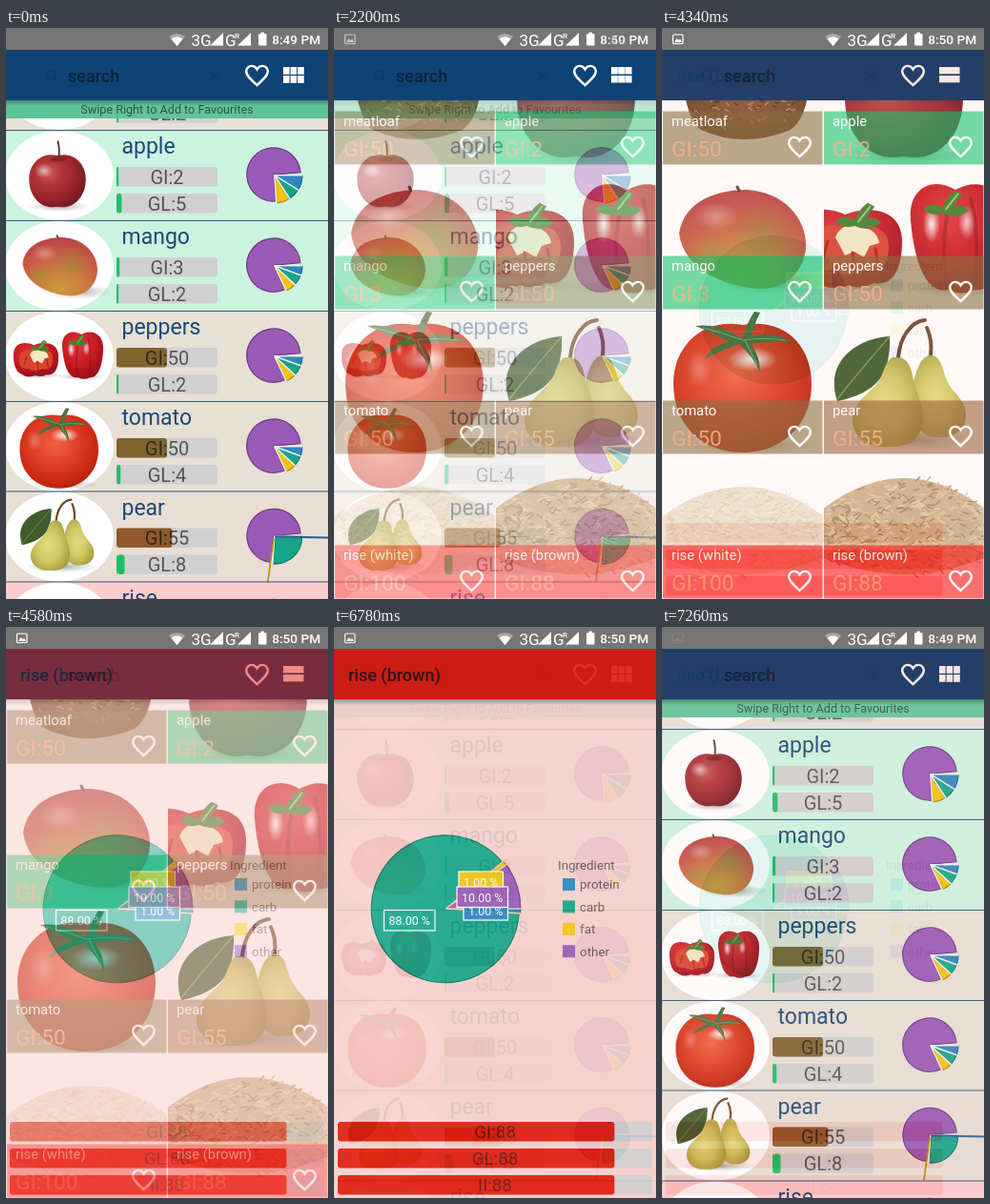
Animation, 338 px wide and 600 px high, one loop 7.32 s. Source, as an HTML page:

```html
<!DOCTYPE html>
<html lang="en">
<head>
<meta charset="utf-8">
<title>Food index app</title>
<style>
  html, body { margin: 0; width: 100%; height: 100%; overflow: hidden; background: #fff; }
  #stage { display: block; width: 338px; height: 600px; font-family: Roboto, "Open Sans", sans-serif; }
</style>
</head>
<body>
<svg id="stage" viewBox="0 0 338 600" xmlns="http://www.w3.org/2000/svg"></svg>
<script>
const LOOP = 7320, STEP = 60;
const GREEN = '#00c461', BROWN = '#80642f', RUST = '#8f592b', RED = '#ff0000';
const SLICES = [['#2e86c1', '#1f5f8b'], ['#17a589', '#0e7562'], ['#f1c40f', '#a88709'], ['#9b59b6', '#6c3b82']];

// --- drawing helpers ---
const rect = (x, y, w, h, fill, extra = '') =>
  `<rect x="${x}" y="${y}" width="${w}" height="${h}" fill="${fill}" ${extra}/>`;
const ellipse = (x, y, rx, ry, fill, extra = '') =>
  `<ellipse cx="${x}" cy="${y}" rx="${rx}" ry="${ry}" fill="${fill}" ${extra}/>`;
const path = (d, fill, extra = '') => `<path d="${d}" fill="${fill}" ${extra}/>`;
const line = (d, color, width, extra = '') =>
  path(d, 'none', `stroke="${color}" stroke-width="${width}" stroke-linecap="round" ${extra}`);
const text = (x, y, size, fill, label, extra = '') =>
  `<text x="${x}" y="${y}" font-size="${size}" fill="${fill}" ${extra}>${label}</text>`;
const MIDDLE = 'text-anchor="middle"';
const MEDIUM = 'font-weight="500"';

const radial = (id, cx, cy, r, ...stops) =>
  `<radialGradient id="${id}" cx="${cx}" cy="${cy}" r="${r}">${stops.map((s, i) => {
    const [color, alpha = 1] = s.split('/');
    return `<stop offset="${i / (stops.length - 1)}" stop-color="${color}" stop-opacity="${alpha}"/>`;
  }).join('')}</radialGradient>`;

const defs = `<defs>
  ${radial('appleSkin', .35, .35, .72, '#c85a55', '#b0333a', '#9a242c', '#701820')}
  ${radial('mangoSkin', .5, .85, .85, '#c99a3c', '#d0803f', '#c95a45', '#b84344')}
  ${radial('olive', .5, .5, .5, '#8f8f3c/.9', '#8f8f3c/0')}
  ${radial('glow', .5, .5, .5, '#fff/.95', '#fff/0')}
  ${radial('tomatoSkin', .45, .4, .7, '#f06440', '#e3452a', '#d02d14', '#a81d0b')}
  ${radial('pepperSkin', .4, .3, .8, '#e0353a', '#c81a22', '#8a0c14')}
  ${radial('pearSkin', .45, .5, .62, '#e4dc84', '#d0c862', '#a39a3a')}
  ${radial('loafSkin', .5, .35, .75, '#96603c', '#83502f', '#5f351c')}
  ${radial('shade', .5, .5, .5, '#444/.45', '#777/0')}
  <linearGradient id="drop" x2="0" y2="1"><stop stop-opacity=".32"/><stop offset="1" stop-opacity="0"/></linearGradient>
</defs>`;

// --- foods, centred on the origin ---
function random(seed) {
  return () => (seed = (seed * 16807) % 2147483647) / 2147483647;
}

// Short seeded strokes spread between a curved top and a flat bottom.
function grains(seed, count, halfWidth, top, bottom, length, shades) {
  const next = random(seed);
  return shades.map(color => {
    let d = '';
    for (let i = 0; i < count; i++) {
      const x = (next() * 2 - 1) * halfWidth, y = top(x) + next() * (bottom(x) - top(x)), a = next() * 1.8 - .9;
      d += `M${x.toFixed(1)} ${y.toFixed(1)}l${(length * Math.cos(a)).toFixed(1)} ${(length * Math.sin(a)).toFixed(1)}`;
    }
    return line(d, color, 1.6);
  }).join('');
}

function rice(seed, peak, edge, base, shades) {
  const top = x => peak + (edge - peak) * (x / 84) ** 2;
  const bottom = x => 50 - 18 * (x / 84) ** 2;
  return path(`M-86 ${edge}Q0 ${2 * peak - edge} 86 ${edge}V32Q0 68 -86 32Z`, base) +
    grains(seed, 210, 84, top, bottom, 6, shades);
}

const calyx = (x, y, scale) => `<g transform="translate(${x} ${y}) scale(${scale})">` +
  path('M-4 2Q-18 -6 -26 4Q-16 13 -4 9Q14 17 27 5Q16 -4 9 1L19 -14L11 -18Q0 -10 -4 2Z', '#467f2b') +
  line('M0 4L14 -14', '#a5c478', 2) + '</g>';

const foods = {
  apple: ellipse(3, 56, 68, 12, 'url(#shade)') +
    path('M0 -55C30 -64 62 -42 62 -4C62 34 38 59 10 58Q0 56 -10 58C-38 59 -62 34 -62 -4C-62 -42 -30 -64 0 -55Z', 'url(#appleSkin)') +
    ellipse(2, -47, 18, 5, '#6d1718', 'opacity=".6"') + ellipse(-30, -22, 20, 16, 'url(#glow)', 'opacity=".6"') +
    line('M2 -46Q6 -66 1 -86', '#5d3a22', 4),
  mango: ellipse(32, 47, 60, 13, 'url(#shade)') +
    path('M-67 -4C-63 -34 -34 -50 4 -50C44 -48 68 -18 66 12C62 42 40 54 18 54C-14 53 -62 36 -67 -4Z', 'url(#mangoSkin)') +
    ellipse(22, -4, 36, 34, 'url(#olive)', 'opacity=".55"') + ellipse(-32, 18, 30, 22, 'url(#olive)', 'opacity=".5"') +
    ellipse(-28, -22, 24, 15, 'url(#glow)', 'opacity=".35"') + line('M-4 -49l-2 -4', '#5d4526', 3),
  peppers: ellipse(-50, 50, 62, 8, 'url(#shade)') + ellipse(55, 53, 60, 9, 'url(#shade)') +
    path('M-112 5C-114 -32 -84 -34 -62 -24C-36 -34 -2 -30 -2 4C-2 34 -12 52 -32 48Q-46 56 -58 50Q-78 58 -92 47C-106 42 -111 24 -112 5Z', 'url(#pepperSkin)') +
    path('M-99 10C-96 -12 -78 -16 -58 -10C-38 -16 -17 -12 -16 8C-16 32 -28 38 -42 34Q-58 44 -74 34C-90 36 -100 28 -99 10Z', '#d8452f') +
    path('M-72 0Q-66 -16 -46 -12Q-28 -8 -26 6L-36 9L-42 21L-52 15L-62 19Z', '#f3e8c4') +
    line('M-54 16l3 22M-30 12l3 18M-80 4l-5 18', '#b31d1c', 3) + calyx(-48, -20, .9) +
    path('M7 -18C4 -54 32 -64 54 -50C82 -66 110 -48 107 -12C106 22 96 58 74 55Q60 62 46 55C24 60 11 28 7 -18Z', 'url(#pepperSkin)') +
    path('M50 -42Q36 6 46 53M70 -42Q80 4 74 53', 'none', 'stroke="#820b10" stroke-width="4" opacity=".4"') +
    ellipse(29, -14, 9, 20, 'url(#glow)') + ellipse(66, -16, 9, 18, 'url(#glow)', 'opacity=".8"') +
    calyx(44, -33, .9),
  tomato: ellipse(8, 67, 66, 9, 'url(#shade)') +
    path('M0 -60C42 -68 72 -40 72 2C72 46 40 74 0 74C-42 74 -73 46 -73 2C-73 -40 -40 -68 0 -60Z', 'url(#tomatoSkin)') +
    ellipse(10, -24, 26, 13, 'url(#glow)') + ellipse(-46, -14, 14, 20, 'url(#glow)', 'opacity=".3"') +
    path('M-2 -46Q-24 -62 -50 -59Q-32 -52 -14 -42Q-34 -38 -40 -24Q-22 -34 -4 -40Q10 -28 18 -10Q18 -28 8 -40' +
      'Q30 -44 52 -42Q34 -54 9 -48Q12 -62 18 -73L12 -74Q4 -62 1 -50Z', '#4c6f3a') +
    line('M-42 -57Q-16 -50 0 -44Q24 -47 44 -44M2 -44L15 -18', '#8aa566', 1.2),
  pear: ellipse(5, 61, 68, 11, 'url(#shade)') +
    path('M-15 -48C-46 -46 -70 -28 -73 -4Q-74 10 -70 20C-48 16 -28 6 -20 -12Q-14 -28 -15 -48Z', '#3f5c2c') +
    line('M-70 18Q-48 -10 -15 -48', '#7d9353', 1.3) +
    line('M28 -28Q30 -44 24 -57', '#6d4a2a', 4) +
    path('M28 -28C38 -28 40 -16 44 -4C50 12 66 18 65 36C64 54 48 59 34 58C18 58 4 40 8 12C10 -4 16 -28 28 -28Z', 'url(#pearSkin)') +
    line('M-6 -26C-4 -48 8 -64 22 -65', '#6d4a2a', 4) +
    path('M-8 -26C8 -26 8 -8 12 6C18 22 22 34 19 46C16 64 0 69 -18 68C-40 69 -54 56 -54 40C-53 20 -36 12 -27 0C-20 -10 -20 -27 -8 -26Z', 'url(#pearSkin)'),
  meatloaf: path('M-64 -40Q-40 -66 0 -64Q45 -66 70 -38Q72 20 50 36Q0 56 -44 36Q-64 20 -64 -40Z', 'url(#loafSkin)') +
    grains(7, 60, 56, () => -45, () => 34, 4, ['#b27d52', '#5a311a']),
  whiteRice: rice(11, -42, -10, '#ede0cb', ['#f6ecdc', '#e3d3b8', '#f1e5d1']),
  brownRice: rice(29, -51, -18, '#cfb08a', ['#e6d0ae', '#b08a62', '#d9bd97'])
};

// --- interface parts ---
const heart = (x, y, color) => line(
  'M0 8C-5 3.5 -9 0 -9 -3.5C-9 -6 -7 -8 -4.5 -8C-2.7 -8 -1 -7 0 -5.3C1 -7 2.7 -8 4.5 -8C7 -8 9 -6 9 -3.5C9 0 5 3.5 0 8Z',
  color, 1.9, `transform="translate(${x} ${y}) scale(1.26)"`);

function statusBar(time, picture) {
  const icon = picture
    ? rect(11.5, 7, 10.5, 9.5, 'none', 'stroke="#fff" stroke-width="1.2" rx="1"') + path('M13 15l2.5 -4 2 2 1.5 -1.5 2 3.5Z', '#fff') : '';
  return rect(0, 0, 338, 23, '#757575') + icon +
    path('M171 9Q179.5 3 188 9L179.5 19Z', '#a9a9a9') + path('M173.5 11.5Q179.5 7 185.5 11.5L179.5 19Z', '#fff') +
    text(194.5, 18.5, 17, '#fff', '3G') + path('M214 18.5H228V5Z', '#fff') +
    text(230, 18.5, 17, '#fff', 'G') + text(240, 11, 8, '#fff', 'R', MEDIUM) + path('M243 18.5H257V5Z', '#fff') +
    rect(265, 6, 8.5, 12.5, '#fff', 'rx="1"') + rect(267.5, 4.5, 3.5, 2, '#fff') +
    text(330.3, 17, 13.7, '#fff', time, 'text-anchor="end" ' + MEDIUM);
}

function searchBar() {
  const faint = '#0d3d6c';
  return rect(0, 23, 338, 53, '#0f4375') +
    `<circle cx="47" cy="49" r="4.5" fill="none" stroke="${faint}" stroke-width="2"/>` +
    line('M50.5 52.5l5 5M214 46l9 9M223 46l-9 9', faint, 1.6) +
    text(65, 57, 18, '#0a2440', 'search', MEDIUM) + heart(263.5, 50, '#fff');
}

function pie(cx, cy, r, bounds, gap, seam, shift) {
  const at = (deg, len, ox = 0, oy = 0) => {
    const a = deg * Math.PI / 180;
    return `${(cx + ox + len * Math.cos(a)).toFixed(2)} ${(cy + oy + len * Math.sin(a)).toFixed(2)}`;
  };
  const edges = [0, ...bounds, 360].map((e, i) => e + (i === 4 ? -shift : 0));
  const wedges = SLICES.map(([fill, stroke], i) => {
    const from = edges[i], to = edges[i + 1], mid = (from + to) * Math.PI / 360;
    const o = [gap * Math.cos(mid), gap * Math.sin(mid)];
    return path(`M${at(0, 0, ...o)}L${at(from, r, ...o)}A${r} ${r} 0 ${+(to - from > 180)} 1 ${at(to, r, ...o)}Z`,
      fill, `stroke="${stroke}" stroke-width="1.2" stroke-linejoin="round"`);
  });
  const seams = edges.slice(0, 4).map(e => `M${cx} ${cy}L${at(e, r + 1)}`).join('');
  return wedges.join('') + line(seams, seam, 1.5);
}

function meter(x, y, w, label, value, color, track = '#d0d0d0', size = 20, ink = '#00000098') {
  return rect(x, y, w, 20.5, track, 'rx="3"') +
    rect(x, y, w * value / 100, 20.5, color, `rx="${Math.min(3, value / 2)}"`) +
    text(169, y + (size > 19 ? 17.5 : 17), size, ink, `${label}:${value}`, MIDDLE);
}

// --- screens ---
function listRow(index, name, color, gi, gl, bounds, food, scale = 1, dx = 0, dy = 0) {
  const y = 107.5 + 95 * index - (index > 3 ? .5 : 0);
  return rect(0, y, 338, 95, '#fff') + rect(0, y, 338, 95, color, 'opacity=".2"') +
    ellipse(56, y + 47.5, 57, 47, '#fff') +
    (food ? `<g transform="translate(${56 + dx} ${y + 47 + dy}) scale(${scale})">${foods[food]}</g>` : '') +
    text(121.5, y + 24.5, 23, '#1d4877', name) +
    meter(116, y + 38.5, 106, 'GI', gi, color === GREEN ? '#1dbf64' : color) +
    meter(116, y + 66.5, 106, 'GL', gl, '#1dbf64') +
    pie(281.8, y + 47.2, 28.2, bounds, 1, '#f2f5f2', 5) +
    line(`M0 ${y}H338`, '#35557f', 1);
}

function listScreen() {
  const thin = [20, 43, 65];
  const tiles = [0, 1, 2, 3, 4, 5].map(i => rect(291 + 7.6 * (i % 3), 41 + 9 * (i > 2), 6.6, 7.8, '#fff')).join('');
  return listRow(-1, 'meatloaf', BROWN, 50, 2, thin) +
    listRow(0, 'apple', GREEN, 2, 5, [32, 57, 86], 'apple', .48, -2, 6) +
    listRow(1, 'mango', GREEN, 3, 2, thin, 'mango', .59, 1, 0) +
    listRow(2, 'peppers', BROWN, 50, 2, thin, 'peppers', .43, 0, -1) +
    listRow(3, 'tomato', BROWN, 50, 4, thin, 'tomato', .57, 0, 2) +
    listRow(4, 'pear', RUST, 55, 8, [2, 94, 97], 'pear', .56, 0, -2) +
    line('M283 534.5L338 535.5', '#27608f', 1.8) + line('M281 537L275 581', '#b8920f', 1.8) +
    listRow(5, 'rise', RED, 100, 80, thin) +
    rect(0, 76, 338, 19, '#5fc499') + rect(0, 76, 338, 6, 'url(#drop)') +
    text(169, 90, 12.6, '#2c5647', 'Swipe Right to Add to Favourites', MIDDLE) +
    searchBar() + tiles + statusBar('8:49 PM', false);
}

function gridCell(index, name, color, gi, food, dx = 0, dy = 0) {
  const x = index % 2 ? 170 : 1, y = -8 + 152 * Math.floor(index / 2);
  return `<svg x="${x}" y="${y}" width="167.5" height="151.5" viewBox="-84 -76 167.5 151.5">` +
    `<g transform="translate(${dx} ${dy})">${foods[food]}</g></svg>` +
    rect(x, y + 95.5, 167.5, 56, color, 'opacity=".6"') +
    text(x + 9, y + 111, 14.8, '#fff', name) +
    text(x + 9, y + 143, 22.8, '#ffab80', `GI:${gi}`, 'opacity=".85"') +
    heart(x + 143.5, y + 133, '#fff');
}

function gridScreen() {
  return rect(0, 0, 338, 600, '#fffdfd') +
    gridCell(0, 'meatloaf', BROWN, 50, 'meatloaf', 0, 3) + gridCell(1, 'apple', GREEN, 2, 'apple', 0, 10) +
    gridCell(2, 'mango', GREEN, 3, 'mango') + gridCell(3, 'peppers', BROWN, 50, 'peppers') +
    gridCell(4, 'tomato', BROWN, 50, 'tomato') + gridCell(5, 'pear', RUST, 55, 'pear') +
    gridCell(6, 'rise (white)', RED, 100, 'whiteRice') + gridCell(7, 'rise (brown)', RED, 88, 'brownRice') +
    searchBar() + rect(291, 41, 21.5, 7.3, '#fff') + rect(291, 50, 21.5, 7.3, '#fff') + statusBar('8:50 PM', true);
}

function detailScreen() {
  const tag = (x, y, w, h, fill, label) =>
    rect(x, y, w, h, fill, 'stroke="#fff" stroke-width="1.2"') + text(x + w / 2, y + h / 2 + 5, 12.4, '#fff', label, MIDDLE);
  const legend = ['protein', 'carb', 'fat', 'other'].map((label, i) =>
    rect(240, 264 + 23.4 * i, 13, 13, SLICES[i][0]) + text(258, 275.3 + 23.5 * i, 13.4, '#6b5856', label)).join('');
  const meters = ['GI', 'GL', 'II'].map((label, i) =>
    meter(4, 520 + 28 * i, 330, label, 88, '#e0190b', '#d2d0d0', 18.8, '#6c120c')).join('');
  return rect(0, 0, 338, 600, '#f8d1cd') + rect(0, 76, 338, 6, 'url(#drop)') +
    rect(0, 23, 338, 53, '#e0190b') + text(15, 57, 18, '#33100d', 'rise (brown)', MEDIUM) +
    pie(117.5, 296, 77.5, [3.6, 320.4, 324], .8, '#f3cfae', 0) +
    tag(52.5, 297.5, 53.5, 21.5, 'none', '88.00 %') + tag(131, 257, 46.5, 21.5, SLICES[2][0], '1.00 %') +
    tag(136, 287, 46.5, 21, SLICES[0][0], '1.00 %') + tag(129, 273, 53.5, 21.5, SLICES[3][0], '10.00 %') +
    text(235, 255, 13.4, '#6b5856', 'Ingredient') + legend + meters + statusBar('8:50 PM', true);
}

const stage = document.getElementById('stage');
stage.innerHTML = `${defs}<g>${listScreen()}</g><g id="grid">${gridScreen()}</g><g id="detail">${detailScreen()}</g>`;
const grid = document.getElementById('grid'), detail = document.getElementById('detail');

// Each cross-fade advances by a tenth every STEP milliseconds.
const fade = (t, start) => Math.max(0, Math.min(10, Math.floor((t - start) / STEP) + 1)) / 10;

function show(group, opacity) {
  group.setAttribute('opacity', opacity);
  group.setAttribute('visibility', opacity > 0 ? 'visible' : 'hidden');
}

function render(now) {
  const t = now % LOOP;
  show(grid, t < 4880 ? fade(t, 1900) : 0);
  show(detail, t < 6780 ? fade(t, 4340) : 1 - fade(t, 6780));
  requestAnimationFrame(render);
}
render(performance.now());
</script>
</body>
</html>
```
